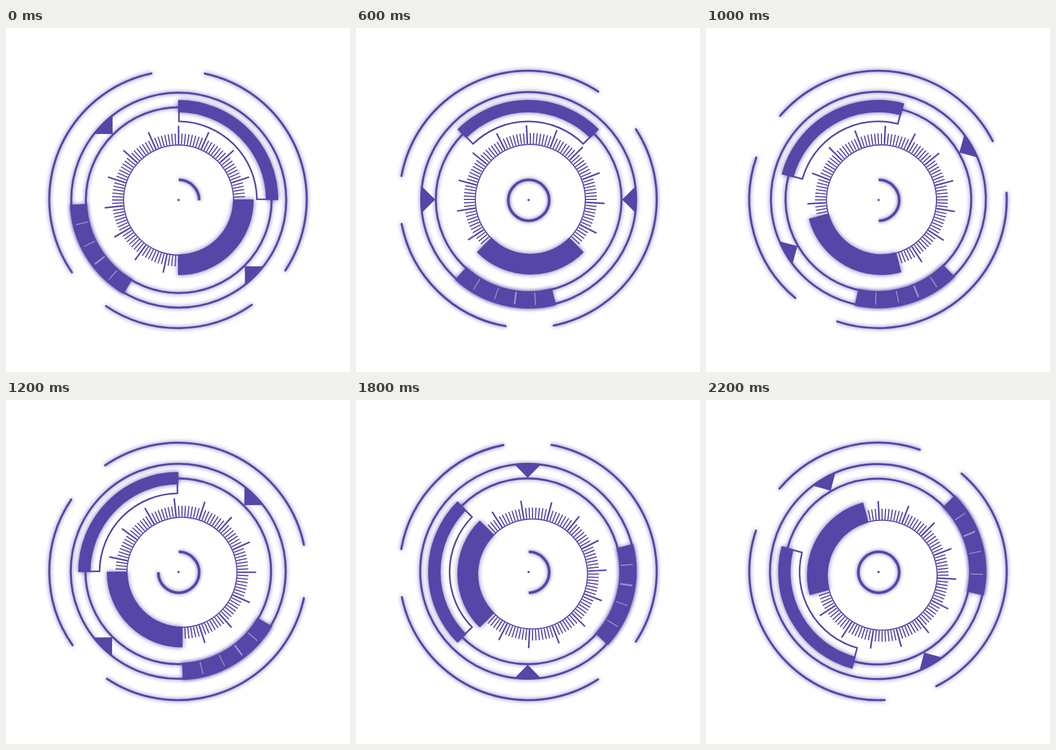
Recreate the animation shown at these times as an HTML page with a canvas. Size 600 px wide and 600 px high, loop 2400 ms.

```html
<!DOCTYPE html>
<html lang="en">
<head>
<meta charset="utf-8">
<title>Rotating dial</title>
<style>
html, body { margin: 0; width: 100%; height: 100%; overflow: hidden; background: #fff; }
canvas { display: block; }
</style>
</head>
<body>
<canvas id="stage" width="600" height="600"></canvas>
<script>
const ctx = document.getElementById('stage').getContext('2d');
const COLOR = '#5546a8';
const STEP_MS = 200, STEPS = 12;
const rad = deg => deg * Math.PI / 180;

function glow(blur) {
  ctx.shadowColor = blur ? 'rgba(85,70,168,.85)' : 'transparent';
  ctx.shadowBlur = blur;
}

function arc(r, from, to, width, blur = 0, cap = 'butt') {
  glow(blur);
  ctx.lineWidth = width;
  ctx.lineCap = cap;
  ctx.beginPath();
  ctx.arc(0, 0, r, rad(from), rad(to));
  ctx.stroke();
}

// Thick arc between two radii
const band = (r0, r1, from, to, blur) => arc((r0 + r1) / 2, from, to, r1 - r0, blur);

function spoke(angle, r0, r1, width) {
  const c = Math.cos(rad(angle)), s = Math.sin(rad(angle));
  ctx.lineWidth = width;
  ctx.beginPath();
  ctx.moveTo(c * r0, s * r0);
  ctx.lineTo(c * r1, s * r1);
  ctx.stroke();
}

// Turn about a pivot, with the part's own centre shifted from it
function group(x, y, angle, dx, dy, paint) {
  ctx.save();
  ctx.translate(x, y);
  ctx.rotate(rad(angle));
  ctx.translate(dx, dy);
  ctx.strokeStyle = ctx.fillStyle = COLOR;
  paint();
  ctx.restore();
}

function outerArcs() {
  for (const [from, to] of [[-78, 33.5], [55, 124], [145.5, 258.1]])
    arc(224.5, from, to, 3.6, 7, 'round');
}

function pointer(angle) {
  const spread = 7.1;
  ctx.beginPath();
  ctx.moveTo(163 * Math.cos(rad(angle)), 163 * Math.sin(rad(angle)));
  ctx.arc(0, 0, 188, rad(angle - spread), rad(angle + spread));
  ctx.fill();
}

function rings() {
  arc(187.5, 0, 360, 3.5, 7);
  arc(162, 0, 360, 3.5, 7);
  glow(0);
  pointer(45);
  pointer(225);
  band(160, 190, 120.4, 177.6, 7);
  glow(0);
  ctx.strokeStyle = '#9c90cd';
  for (const [angle, width] of [[131.3, 1.8], [142.7, 3], [153.9, 1.6], [166.5, 1.8]])
    spoke(angle, 162.5, 184, width);
}

function bracket() {
  band(153, 174.5, -90, 0, 9);
  glow(0);
  ctx.lineWidth = 2.8;
  ctx.beginPath();
  ctx.moveTo(1.3, -173);
  ctx.lineTo(1.3, -137.2);
  ctx.arc(0, 0, 137.2, rad(-89.4), rad(-0.6));
  ctx.lineTo(173, -1.3);
  ctx.stroke();
}

function gauge() {
  arc(96, 0, 360, 2);
  for (let i = 0; i < 120; i++) {
    const major = i % 8 === 0;
    spoke(i * 3 - 90, 97, major ? 129.5 : 116, major ? 2.7 : 2);
  }
  band(95, 131, -0.4, 90.4, 9);
}

function draw() {
  const k = Math.floor(performance.now() / STEP_MS) % STEPS;
  const turn = k * 15;
  ctx.fillStyle = '#fff';
  ctx.fillRect(0, 0, 600, 600);
  group(300, 299, turn, 0, 0, outerArcs);
  group(300.1, 299.9, -turn, 1.2, 0.3, rings);
  group(303.7, 303.2, turn, -2.7, -3.2, gauge);
  group(300.4, 300.1, -turn, 0, 0, bracket);
  group(301.3, 300.5, 0, 0, 0, () => arc(35.7, -90, -90 + 90 * (k % 4 + 1), 4.6, 6));
  group(301, 300, 0, 0, 0, () => {
    ctx.beginPath();
    ctx.arc(0, 0, 2, 0, 2 * Math.PI);
    ctx.fill();
  });
  requestAnimationFrame(draw);
}
draw();
</script>
</body>
</html>
```
